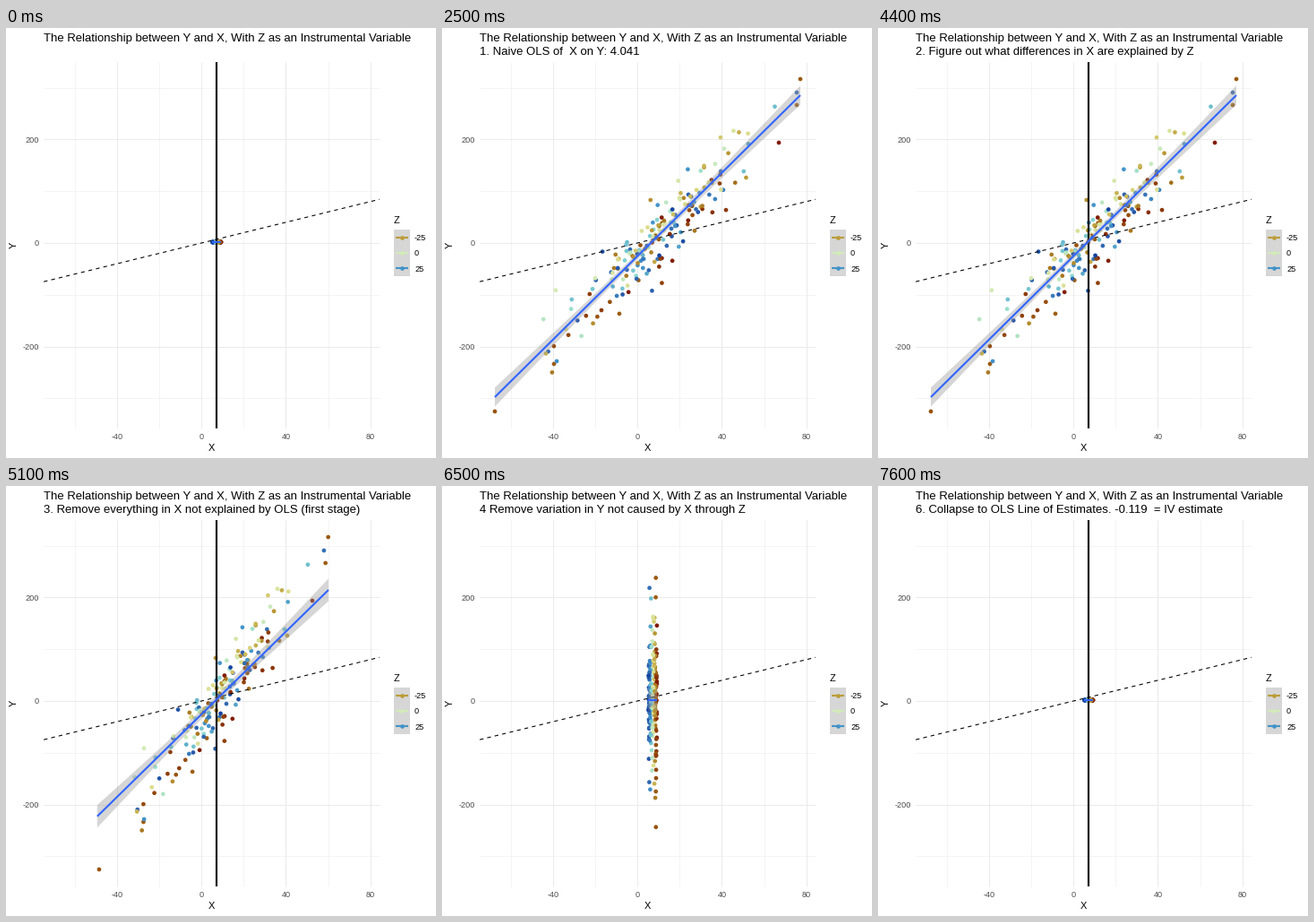
Animation of 480 by 480 pixels, one loop 10 s. Source, as a matplotlib script:

```python
import numpy as np
import matplotlib.pyplot as plt
from matplotlib.animation import FuncAnimation
from matplotlib.colors import LinearSegmentedColormap
from matplotlib.patches import Polygon, Rectangle

plt.rcParams["font.family"] = "Liberation Sans"
SIZE, STEP, LOOP = 480, 100, 10000
LEFT, RIGHT, TOP, BOTTOM = 42, 417, 38, 447
MID_X, MID_Y = 235, 239
GRAY, BLUE = "#4d4d4d", "#3366ff"
DOT = 4.7 ** 2
TITLE = "The Relationship between Y and X, With Z as an Instrumental Variable"
CAPTIONS = [
    (0, ""),
    (2300, "1. Naive OLS of  X on Y: 4.041"),
    (3700, "2. Figure out what differences in X are explained by Z"),
    (5100, "3. Remove everything in X not explained by OLS (first stage)"),
    (6500, "4 Remove variation in Y not caused by X through Z"),
    (7400, "6. Collapse to OLS Line of Estimates. -0.119  = IV estimate"),
]
ROMA = LinearSegmentedColormap.from_list("roma", [
    "#7e1700", "#99560f", "#bb9d38", "#dddb85", "#d3ebb8",
    "#8cdbd2", "#4494c9", "#2e62ae", "#033198"])


def px(v):
    return 218.2 + 2.357 * v


def py(v):
    return 240 - 0.578 * v


def shade(z):
    return ROMA((z + 50) / 100)


def make_cloud(count=180):
    """Points around the naive line; a Z near zero lifts them above it."""
    rng = np.random.default_rng(12)
    z = rng.uniform(-49, 46, count)
    x = rng.normal(MID_X, 50, count)
    lift = 18 - 0.75 * np.abs(z)
    y = 412 - (x - 59) * 337 / 341 - lift + rng.normal(0, 19, count)
    return np.column_stack([x, y, z])


# extreme points: x, y, Z
CORNERS = [(59, 428, -38), (400, 57, -37), (396, 72, 34),
           (396, 86, -36), (376, 128, -49), (125, 375, -37)]
xs, ys, zs = np.vstack([CORNERS, make_cloud()]).T
fit_x = MID_X - 0.1 * zs


def band(x0, x1, y0, y1, half, spread):
    """Rows: x, fitted y, half width of the interval."""
    u = np.linspace(-1, 1, 41)
    return np.array([(x0 + x1) / 2 + u * (x1 - x0) / 2,
                     (y0 + y1) / 2 + u * (y1 - y0) / 2,
                     np.hypot(half, spread * u)])


flat = (fit_x.min(), fit_x.max(), MID_Y, MID_Y)
STATES = {
    "point": (np.column_stack([fit_x, np.full_like(ys, MID_Y)]), band(*flat, 0, 0)),
    "full": (np.column_stack([xs, ys]), band(59, 400, 412, 75, 3.6, 10)),
    "column": (np.column_stack([fit_x, ys]), band(*flat, 9.5, 16)),
}
MOVES = [(0, "point", "point"), (2300, "point", "full"),
         (5100, "full", "column"), (6500, "column", "point")]

fig = plt.figure(figsize=(SIZE / 72, SIZE / 72), dpi=72, facecolor="white")
ax = fig.add_axes([0, 0, 1, 1])
ax.set_xlim(0, SIZE)
ax.set_ylim(SIZE, 0)
ax.axis("off")


def label(x, y, s, size, color="black", **kw):
    kw = {"va": "baseline", "ha": "left", **kw}
    return ax.text(x, y, s, fontsize=size, color=color, **kw)


def rule(x, y, width, color, **kw):
    return ax.plot(x, y, lw=width, color=color, solid_capstyle="butt", **kw)[0]


# grid and axis labels
for v in range(-60, 81, 20):
    major = v % 40 == 0
    rule([px(v)] * 2, [TOP, BOTTOM], 1.07 if major else 0.53, "#ebebeb", zorder=1)
    if major:
        label(px(v), 459, str(v), 9.1, GRAY, ha="center")
for v in range(-300, 301, 100):
    major = v % 200 == 0
    rule([LEFT, RIGHT], [py(v)] * 2, 1.07 if major else 0.53, "#ebebeb", zorder=1)
    if major:
        label(37, py(v) + 3.4, str(v), 9.1, GRAY, ha="right")
label(229, 472, "X", 11, ha="center")
label(9, 242.5, "Y", 11, ha="center", va="center", rotation=90)
label(42.5, 15, TITLE, 13.1)
caption = label(42.5, 30, "", 13.1)

# legend
label(433, 218, "Z", 11)
ax.add_patch(Rectangle((433, 225), 18, 52, fc="#d6d6d6", ec="none"))
for i, z in enumerate((-25, 0, 25)):
    y = 233.6 + 17.28 * i
    rule([435, 449], [y, y], 2.13, shade(z))
    ax.scatter([442], [y], s=DOT, color=[shade(z)], lw=0, zorder=3)
    label(456, y + 3.6, str(z), 9.1)

# moving layers
dots = ax.scatter(xs, ys, s=DOT, c=shade(zs), lw=0, zorder=3)
ends = np.array([-74.7, 84.3])
rule(px(ends), py(ends), 1.07, "black", dashes=(4, 4), dash_capstyle="butt", zorder=4)
wall = rule([MID_X] * 2, [TOP, BOTTOM], 2.13, "black", zorder=5)
ribbon = ax.add_patch(Polygon([(0, 0), (1, 0), (1, 1)], fc="#999999", alpha=0.4, lw=0, zorder=6))
trend = rule([], [], 2.13, BLUE, zorder=7)


def latest(items, t):
    return [item for item in items if item[0] <= t][-1]


def draw(i):
    t = i * STEP
    start, a, b = latest(MOVES, t)
    u = min((t - start + STEP) / (3 * STEP), 1)
    k = (1 - np.cos(np.pi * u)) / 2
    spots, (x, y, half) = [p + (q - p) * k for p, q in zip(STATES[a], STATES[b])]
    dots.set_offsets(spots)
    trend.set_data(x, y)
    ribbon.set_xy(np.column_stack([np.r_[x, x[::-1]],
                                   np.r_[y - half, (y + half)[::-1]]]))
    caption.set_text(latest(CAPTIONS, t)[1])
    wall.set_visible(t < 2300 or 4400 <= t < 6500 or t >= 7600)
    return dots, trend, ribbon, caption, wall


anim = FuncAnimation(fig, draw, frames=LOOP // STEP, interval=STEP, repeat=True, blit=False)
plt.show()
```
